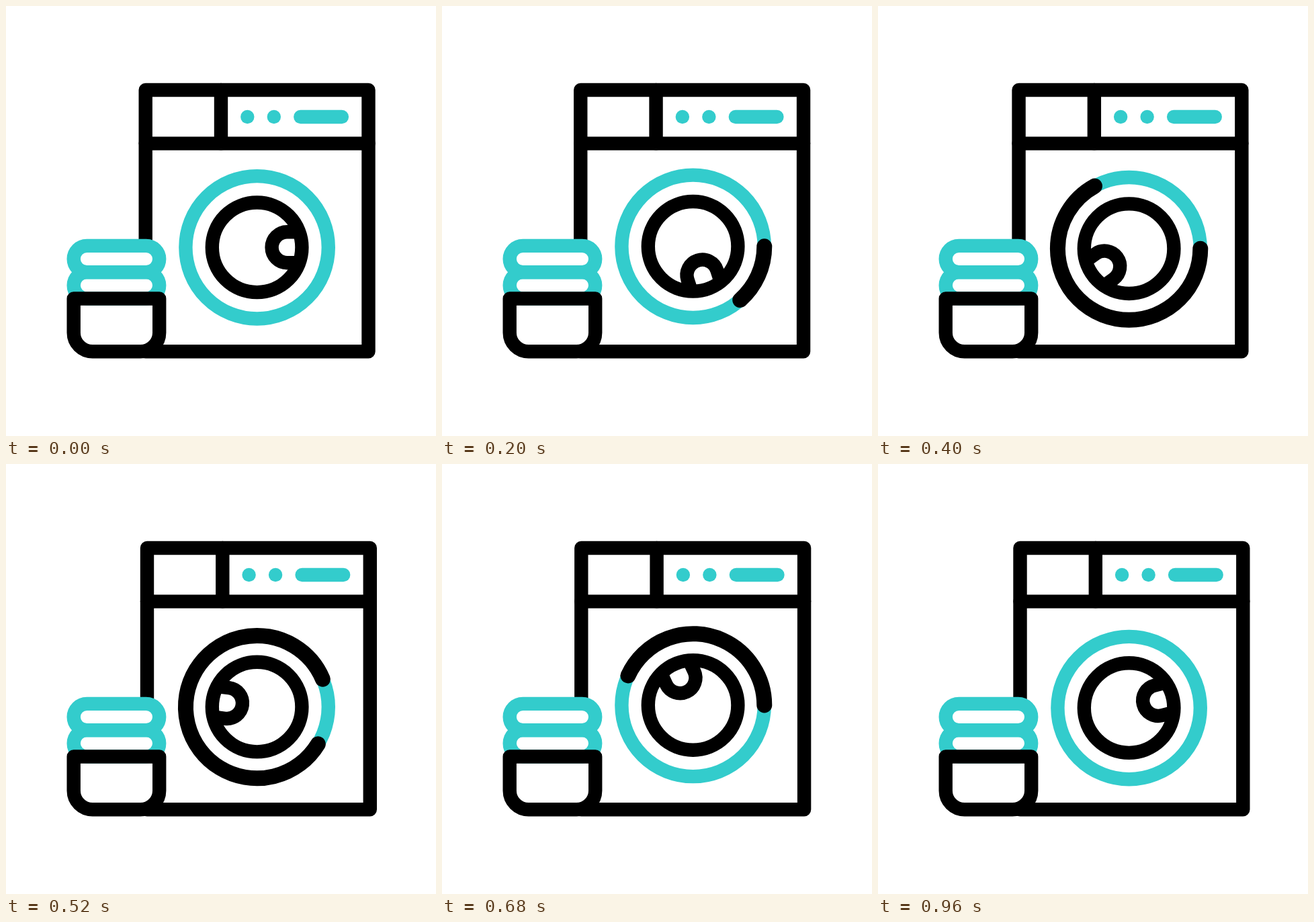
These frames come from a looping animation (640x640 px, 1 s). An HTML page with a canvas:

```html
<!DOCTYPE html>
<html lang="en">
<head>
<meta charset="utf-8">
<title>Washing machine</title>
<style>
  html, body { margin: 0; width: 100%; height: 100%; overflow: hidden; background: #fff; }
  canvas { display: block; width: 640px; height: 640px; }
</style>
</head>
<body>
<canvas id="stage" width="640" height="640"></canvas>
<script>
const ctx = document.getElementById('stage').getContext('2d');
const BLACK = '#000', TEAL = '#33cccc', LINE = 20.4;
const LOOP = 1000, STEP = 40, TAU = Math.PI * 2;
const CX = 373.6, CY = 359.3;

// Shake offset at key steps
const SHAKE = [[0, 0], [3, -3.1], [8, 1.6], [13, 2.3], [14, 7.3], [17, -0.4],
               [18.5, -5.8], [20, -2.3], [24, 3.8], [25, 0]];

const ease = u => {
  u = Math.min(1, Math.max(0, u));
  return u * u * (3 - 2 * u);
};

function shakeAt(n) {
  const i = SHAKE.findIndex(k => k[0] > n);
  const [n0, a] = SHAKE[i - 1], [n1, b] = SHAKE[i];
  return a + (b - a) * ease((n - n0) / (n1 - n0));
}

function stroke(color, trace, width = LINE) {
  ctx.beginPath();
  trace();
  ctx.strokeStyle = color;
  ctx.lineWidth = width;
  ctx.stroke();
}

function line(color, ...pts) {
  stroke(color, () => pts.forEach(([x, y]) => ctx.lineTo(x, y)));
}

function ring(color, r) {
  stroke(color, () => ctx.arc(0, 0, r, 0, TAU));
}

function dot(x, y) {
  ctx.beginPath();
  ctx.arc(x, y, LINE / 2, 0, TAU);
  ctx.fillStyle = TEAL;
  ctx.fill();
}

function drawBody(dx) {
  ctx.save();
  ctx.translate(dx, 0);
  line(BLACK, [207.7, 514.3], [539.5, 514.3], [539.5, 125], [207.7, 125], [207.7, 356]);
  line(BLACK, [207.7, 204.6], [539.5, 204.6]);
  line(BLACK, [320, 125], [320, 204.6]);
  dot(359.3, 165);
  dot(398.8, 165);
  line(TEAL, [438.3, 165], [499.9, 165]);
  ctx.restore();
}

function drawDoor(n, dy) {
  ctx.save();
  ctx.translate(CX, CY + dy);
  ring(TEAL, 106.2);

  const from = ease((n - 11) / 11) * TAU;
  const to = ease((n - 2) / 13) * TAU;
  if (to > from) stroke(BLACK, () => ctx.arc(0, 0, 106.2, from, to), 23);

  ring(BLACK, 66.8);
  ctx.rotate(n / 25 * TAU);
  ctx.lineCap = 'butt';
  stroke(BLACK, () => {
    ctx.moveTo(60, -23);
    ctx.lineTo(45, -23);
    ctx.arc(45, 0, 23, -TAU / 4, TAU / 4, true);
    ctx.lineTo(60, 23);
  });
  ctx.restore();
}

function drawBasket() {
  for (const y of [356.9, 396.1]) {
    stroke(TEAL, () => ctx.roundRect(100.7, y, 127.5, 39.3, 19.65));
  }
  stroke(BLACK, () => ctx.roundRect(100.7, 435.5, 127.5, 78.7, [0, 0, 28, 28]));
}

function draw(now) {
  const n = Math.floor((now % LOOP) / STEP);
  const shake = shakeAt(n);
  ctx.fillStyle = '#fff';
  ctx.fillRect(0, 0, 640, 640);
  ctx.lineCap = ctx.lineJoin = 'round';
  drawBody(shake);
  drawDoor(n, shake);
  drawBasket();
}

const start = performance.now();
function tick() {
  draw(performance.now() - start);
  requestAnimationFrame(tick);
}
tick();
</script>
</body>
</html>
```
